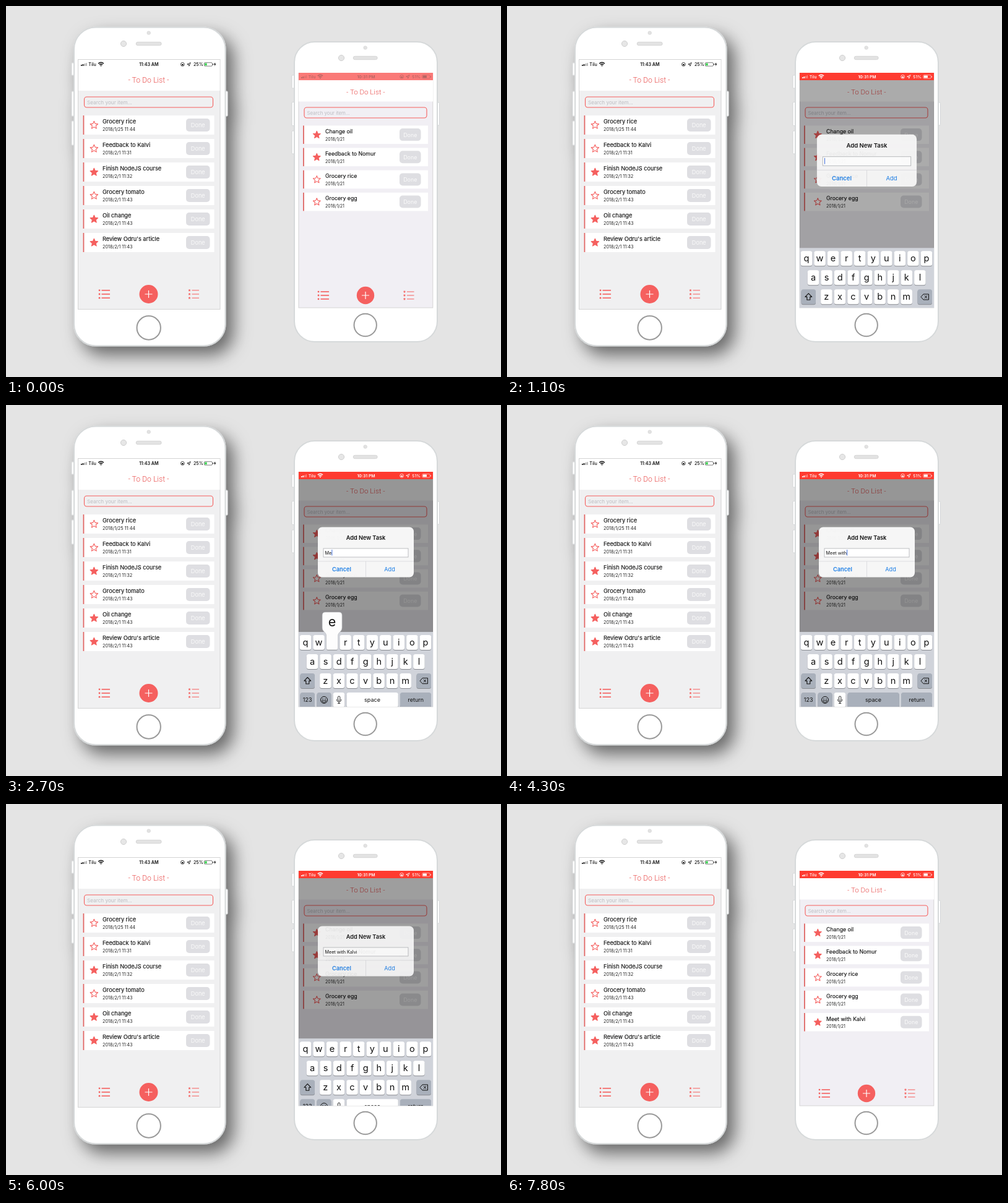
An HTML page that plays this animation: 800 px wide and 600 px high, repeating every 8 s.

```html
<!DOCTYPE html>
<html lang="en">
<head>
<meta charset="utf-8">
<title>To do list</title>
<style>
  html, body { margin: 0; width: 100%; height: 100%; overflow: hidden; background: #e4e4e4; }
  svg { display: block; width: 800px; height: 600px; font-family: Inter, sans-serif; }
  text { white-space: pre; }
  .mid { text-anchor: middle; }
  .title { font: 300 12px Roboto, sans-serif; text-anchor: middle; fill: #e9504f; }
</style>
</head>
<body>
<svg id="stage" viewBox="0 0 800 600"></svg>
<script>
const RED = '#f5605f';
const LOOP = 8000, STEP = 100;

const rect = (x, y, w, h, r, fill, more = '') =>
  `<rect x="${x}" y="${y}" width="${w}" height="${h}" rx="${r}" fill="${fill}" ${more}/>`;
const circle = (x, y, r, fill, more = '') =>
  `<circle cx="${x}" cy="${y}" r="${r}" fill="${fill}" ${more}/>`;
const path = (d, more = '') => `<path d="${d}" ${more}/>`;
const label = (x, y, size, str, more = '') =>
  `<text x="${x}" y="${y}" font-size="${size}" ${more}>${str}</text>`;
const stroke = (color, width = 1) => `fill="none" stroke="${color}" stroke-width="${width}"`;

function star(x, y, r, more) {
  let points = '';
  for (let i = 0; i < 10; i++) {
    const a = i * Math.PI / 5, d = i % 2 ? r * 0.46 : r;
    points += `${(x + d * Math.sin(a)).toFixed(2)},${(y - d * Math.cos(a)).toFixed(2)} `;
  }
  return `<polygon points="${points}" stroke="${RED}" stroke-linejoin="round" ${more}/>`;
}

// Phone shell: body box, side buttons, camera, speaker, home button.
function shell(p) {
  const { x, y, w, h, cx } = p;
  const edge = 'stroke="#d3d5d7" stroke-width="1"';
  const sides = p.leftKeys.map(([ky, kh]) => rect(x - 4, ky, 6, kh, 1.5, '#fff', edge)).join('') +
    rect(x + w - 2, p.rightKey[0], 5.5, p.rightKey[1], 1.5, '#fff', edge);
  const body = rect(x, y, w, h, p.radius, '#fff', 'stroke="#d6d9da" stroke-width="2"');
  return `<g ${p.shadow ? 'filter="url(#shadow)"' : ''}>${sides}${body}</g>` +
    circle(cx, p.dotY, 2.8, '#e2e2e2', 'stroke="#d2d2d2" stroke-width=".6"') +
    circle(p.camX, p.camY, 4.6, '#e6e6e6', 'stroke="#d0d0d0"') +
    rect(cx - p.speaker / 2, p.camY - 2.7, p.speaker, 5.4, 2.7, '#e3e3e3', 'stroke="#d0d0d0" stroke-width=".8"') +
    circle(cx, p.homeY, p.homeR, '#fff', 'stroke="#999" stroke-width="2"');
}

function status(s) {
  const { x, y, k, cx, right } = s;
  const ink = 'currentColor';
  let bars = '';
  for (let i = 0; i < 4; i++)
    bars += rect(x + i * 2.6 * k, y - 2 - i * 0.9, 1.7 * k, 2 + i * 0.9, 0.3, ink, i > 1 ? 'opacity=".4"' : '');
  const wx = x + 32.5 * k, wy = y;
  const wifi = path(`M${wx - 4.4 * k} ${wy - 3.9}q${4.4 * k} -3.8 ${8.8 * k} 0M${wx - 2.6 * k} ${wy - 2}q${2.6 * k} -2.2 ${5.2 * k} 0`, stroke(ink, 1.4)) +
    circle(wx, wy - 0.6, 1, ink);
  const lock = circle(right, y - 2.6, 2.9, 'none', `stroke="${ink}" stroke-width=".8"`) +
    rect(right - 1.3, y - 3, 2.6, 2, 0, ink);
  const ax = right + 10 * k;
  const arrow = path(`M${ax + 3} ${y - 5.4}l-5.5 2.6 2.6 .4 .4 2.6z`, stroke(ink, 0.8));
  const bx = right + 35 * k, bw = 13 * k;
  const battery = rect(bx, y - 5.4, bw, 5.6, 1.3, 'none', `stroke="${ink}" stroke-width=".7" opacity=".75"`) +
    rect(bx + 0.9, y - 4.5, bw * s.charge, 3.8, 0.5, s.battery) +
    rect(bx + bw + 0.7, y - 3.6, 1, 2, 0.4, ink);
  const bolt = s.bolt ? path(`M${bx + bw + 5} ${y - 6}l-2.6 3.8h1.8l-.6 2.8 2.6 -4h-1.8z`, `fill="${ink}"`) : '';
  return `<g fill="${ink}">${bars}${label(x + 12.3 * k, y, 7.1 * k, 'Tilu', 'font-weight="500"')}${wifi}` +
    label(cx, y, 7.2 * k, s.time, 'class="mid" font-weight="600"') + lock + arrow +
    label(right + 17.6 * k, y, 7.2 * k, s.percent, 'font-weight="500"') + battery + bolt + '</g>';
}

function row(l, i, [name, date, starred], id = '') {
  const y = l.y + i * l.pitch;
  const mark = star(l.starX, y + l.h / 2 + 0.3, l.starR, `fill="${starred ? RED : '#fff'}" stroke-width="1.1" ${id && `id="${id}Star"`}`);
  const [dx, dy, dw, dh] = l.done;
  return `<g ${id && `id="${id}"`}>` + rect(l.x, y, l.w, l.h, 0, '#fff') + rect(l.x, y, 1.8, l.h, 0, '#df6665') + mark +
    label(l.textX, y + l.nameY, l.nameSize, name, 'fill="#0a0a0a" stroke="#0a0a0a" stroke-width=".12"') +
    label(l.textX, y + l.dateY, l.dateSize, date, 'fill="#222"') +
    rect(dx, y + dy, dw, dh, 5, '#dedee2') +
    label(dx + dw / 2, y + dy + dh / 2 + 3.4, l.doneSize, 'Done', 'class="mid" fill="#fafafa"') + '</g>';
}

function tabs({ left, mid, right, y, r, gap }) {
  let out = '';
  for (let i = -1; i <= 1; i++) {
    const ly = y + i * gap;
    out += circle(left + 1.5, ly, 1.4, RED) + rect(left + 5, ly - 0.8, 13.5, 1.6, 0, RED) +
      star(right + 2, ly, 1.8, `fill="${RED}" stroke-width=".4"`) + rect(right + 6, ly - 0.5, 11.5, 1, 0, RED);
  }
  return out + circle(mid, y, r, RED) + path(`M${mid - 6} ${y}h12M${mid} ${y - 6}v12`, stroke('#fff', 1.2));
}

function search(x, y, w, size) {
  return rect(x, y, w, 17, 4, 'none', `stroke="${RED}" stroke-width="1.1"`) +
    label(x + 4.5, y + 11.5, size, 'Search your item...', 'fill="#bdbdc2"');
}

const heading = (x, y, size) => label(x, y, size, '- To Do List -', `class="title" style="font-size:${size}px"`);

const leftList = {
  x: 124.5, y: 177, w: 212, h: 31, pitch: 38, starX: 142.3, starR: 6.6, textX: 156,
  nameY: 13.4, nameSize: 9.2, dateY: 25.4, dateSize: 7.3, done: [291, 5, 38.5, 21], doneSize: 9.2
};
const rightList = {
  x: 480, y: 193.4, w: 202, h: 29.6, pitch: 36.15, starX: 502.3, starR: 6.2, textX: 516,
  nameY: 12.5, nameSize: 8.75, dateY: 24.3, dateSize: 7, done: [636, 4.7, 34.5, 20], doneSize: 8.9
};
const leftItems = [
  ['Grocery rice', '2018/1/25 11:44', 0], ['Feedback to Kalvi', '2018/2/1 11:31', 0],
  ['Finish NodeJS course', '2018/2/1 11:32', 1], ['Grocery tomato', '2018/2/1 11:43', 0],
  ['Oil change', '2018/2/1 11:43', 1], ["Review Odru's article", '2018/2/1 11:43', 1]
];
const rightItems = [
  ['Change oil', '2018/1/21', 1], ['Feedback to Nomur', '2018/1/21', 1],
  ['Grocery rice', '2018/1/21', 0], ['Grocery egg', '2018/1/21', 0]
];

// Keyboard layout in its resting position.
const KEY_W = 18.5, KEY_H = 24, PITCH = 21.55;
const keys = {};
[['qwertyuiop', 484], ['asdfghjkl', 495], ['zxcvbnm', 516.4]].forEach(([letters, x], r) =>
  [...letters].forEach((c, i) => keys[c] = { x: x + i * PITCH, y: 372 + r * 31 }));

const cap = (x, y, w, fill = '#fff', id = '') =>
  rect(x, y + 1, w, KEY_H, 3.5, '#8a8d92') + rect(x, y, w, KEY_H, 3.5, fill, id && `id="${id}"`);

function keyboard() {
  const grey = '#a9b0bb', word = 'class="mid" fill="#111"';
  let out = rect(473, 367, 217, 122, 0, '#d0d3da');
  for (const [c, k] of Object.entries(keys))
    out += cap(k.x - KEY_W / 2, k.y, KEY_W) + label(k.x, k.y + 16.6, 14.6, c, `${word} data-key="${c}"`);
  out += cap(475.5, 434, 23.5, grey, 'shiftCap') + cap(663.5, 434, 23.5, grey) +
    path('M487.3 440.5l5.4 5.6h-2.9v4.9h-5v-4.9h-2.9z', `id="shiftArrow" ${stroke('#111', 1.1)} stroke-linejoin="round"`) +
    path('M669 446.2l4 -4.5h8.5v9h-8.5zM675 444l4 4.4M679 444l-4 4.4', stroke('#111', 1));
  out += cap(475.5, 465, 23.5, grey) + cap(502.5, 465, 23, grey) + cap(528.7, 465, KEY_W) +
    cap(550.5, 465, 83.3, '#fff', 'spaceCap') + cap(637, 465, 50, grey) +
    label(487.2, 480, 9, '123', word) + label(592, 480, 9, 'space', word) + label(662.3, 480, 9, 'return', word) +
    circle(514, 477, 5.5, 'none', 'stroke="#111"') + circle(512, 475.5, 0.8, '#111') + circle(516, 475.5, 0.8, '#111') +
    path('M510.6 478h6.8q-.5 3.2 -3.4 3.2t-3.4 -3.2z', stroke('#111', 0.9)) +
    rect(536.4, 471, 3.4, 7, 1.7, '#fff', 'stroke="#111" stroke-width=".9"') +
    path('M534.4 476q0 4 3.7 4t3.7 -4M538.1 480v2.6M536 482.6h4.2', stroke('#111', 0.9));
  const bubble = 'M-16 -32q0 -5 5 -5h22q5 0 5 5v20c0 7 -6.5 7 -6.5 13v20q0 3 -3 3h-13q-3 0 -3 -3v-20c0 -6 -6.5 -6 -6.5 -13z';
  return `<g id="keyboard">${out}<g id="popup">` + path(bubble, 'fill="#fdfdfd" stroke="#b4b6bb" stroke-width=".6"') +
    label(0, -14, 21.5, '', `${word} id="popupText"`) + '</g></g>';
}

function alertBox() {
  const blue = 'class="mid" fill="#1a7de6"';
  return '<g id="alert">' + rect(-77.5, -40.5, 155, 81, 7, '#f8f8f8', 'fill-opacity=".98"') +
    label(0, -20, 9.2, 'Add New Task', 'class="mid" fill="#111" font-weight="600"') +
    rect(-68.5, -6, 137, 14, 0, '#fff', 'stroke="#aeb0b3" stroke-width=".8"') +
    label(-66, 3.7, 7.2, '', 'id="typed" fill="#111"') + rect(0, -4, 0.9, 9.5, 0, '#2f62d9', 'id="caret"') +
    path('M-77.5 14.8h155M0 14.8v25.7', stroke('#d5d5d8', 0.7)) +
    label(-39, 31, 9.2, 'Cancel', blue + ' font-weight="600"') + label(38.5, 31, 9.2, 'Add', blue) + '</g>';
}

const leftPhone = shell({
  x: 110, y: 34.5, w: 244.5, h: 515, radius: 35, cx: 230.7, shadow: true, leftKeys: [[92, 20], [138, 40], [186, 39]],
  rightKey: [138, 40], dotY: 43.5, camX: 190, camY: 61, speaker: 41, homeY: 520.5, homeR: 19.2
}) + rect(116.5, 86.5, 229.5, 404, 0, '#f0f0f1', 'stroke="#d4d4d4"') + rect(117, 87, 228.5, 50, 0, '#fff') +
  '<g color="#111">' + status({ x: 121, y: 97, k: 1, cx: 231, right: 285.3, time: '11:43 AM', percent: '25%', charge: 0.27, battery: '#3fd455', bolt: true }) + '</g>' +
  heading(230.5, 124, 12.2) + search(126.5, 147, 208, 8.2) + leftItems.map((it, i) => row(leftList, i, it)).join('') +
  tabs({ left: 149.5, mid: 230.5, right: 294.5, y: 466, r: 15, gap: 6.2 });

const rightPhone = shell({
  x: 466, y: 58, w: 231, h: 485, radius: 33, cx: 580.7, leftKeys: [[112, 21], [155.5, 38], [202, 37]],
  rightKey: [156, 37], dotY: 67.5, camX: 542, camY: 84, speaker: 39, homeY: 516, homeR: 18.2
}) + rect(473, 108.5, 216.8, 379.5, 0, '#f1eff4', 'stroke="#d4d4d4"') +
  '<g clip-path="url(#screen)">' + rect(473, 120, 217, 34.5, 0, '#fff') + heading(581.3, 143, 11.5) +
  search(482, 164, 198, 7.8) + rightItems.map((it, i) => row(rightList, i, it)).join('') +
  row(rightList, 4, ['Meet with Kalvi', '2018/1/21', 0], 'added') +
  tabs({ left: 503.5, mid: 581, right: 642, y: 468, r: 14.2, gap: 5.9 }) +
  rect(473, 120, 217, 369, 0, '#000', 'id="dim"') + alertBox() + keyboard() +
  '<g id="status">' + rect(473, 108, 217, 12, 0, '#fe3b30', 'id="statusBar"') +
  status({ x: 477, y: 117, k: 0.95, cx: 582, right: 639.6, time: '10:31 PM', percent: '51%', charge: 0.5, battery: 'currentColor' }) + '</g></g>';

const stage = document.getElementById('stage');
stage.innerHTML = `<defs>
  <filter id="shadow" x="-30%" y="-20%" width="170%" height="150%">
    <feDropShadow dx="12" dy="14" stdDeviation="14" flood-color="#000" flood-opacity=".55"/></filter>
  <clipPath id="screen"><rect x="473" y="108" width="217" height="380"/></clipPath></defs>` + leftPhone + rightPhone;

const $ = id => document.getElementById(id);
const clamp = v => Math.max(0, Math.min(1, v));
const mix = (a, b, p) => `rgb(${a.map((v, i) => Math.round(v + (b[i] - v) * p))})`;
const show = (id, on) => $(id).style.visibility = on ? 'visible' : 'hidden';

// [press, release, key]
const presses = [
  [2400, 2500, 'M'], [2600, 2800, 'e'], [2900, 3000, 'e'], [3200, 3300, 't'], [3500, 3700, ' '],
  [3700, 3800, 'w'], [3900, 4000, 'i'], [4000, 4100, 't'], [4100, 4200, 'h'], [4300, 4400, ' '],
  [4600, 4800, 'K'], [4900, 5000, 'a'], [5000, 5200, 'l'], [5400, 5500, 'v'], [5600, 5700, 'i']
];
const shifts = [[2100, 2500], [4500, 4800]];
const OPEN = 850, CLOSE = 5960, ADDED = 6300, STARRED = 6900;

function render(t) {
  const opening = t < OPEN ? 0 : 1 - Math.exp((OPEN - t) / 155);
  const c = Math.max(0, t - CLOSE) * 0.0133;
  const closing = 1 - (1 + c) * Math.exp(-c);
  const fade = 1 - clamp((t - 5980) / 270);

  const boardY = 122 * (t < CLOSE ? 1 - opening : closing);
  $('keyboard').setAttribute('transform', `translate(0 ${boardY})`);
  $('alert').setAttribute('transform', `translate(581.5 ${298 - 60 * opening}) scale(${1.2 - 0.2 * opening})`);
  $('alert').setAttribute('opacity', clamp(opening * 1.2) * fade);
  $('dim').setAttribute('opacity', 0.41 * opening * fade);

  const typed = presses.filter(([down, up, key]) => t >= (key === ' ' ? up : down)).map(p => p[2]).join('');
  $('typed').textContent = typed;
  $('caret').setAttribute('x', -65.8 + (typed ? $('typed').getComputedTextLength() : 0));
  show('caret', t < 5900);

  const upper = shifts.some(([on, off]) => t >= on && t < off);
  stage.querySelectorAll('[data-key]').forEach(el =>
    el.textContent = upper ? el.dataset.key.toUpperCase() : el.dataset.key);
  $('shiftCap').setAttribute('fill', upper ? '#fff' : '#a9b0bb');
  $('shiftArrow').setAttribute('fill', upper ? '#111' : 'none');

  const active = presses.find(([down, up]) => t >= down && t < up);
  const key = active && active[2];
  $('spaceCap').setAttribute('fill', key === ' ' ? '#a9b0bb' : '#fff');
  const lettered = key && key !== ' ';
  show('popup', lettered);
  if (lettered) {
    const k = keys[key.toLowerCase()];
    $('popup').setAttribute('transform', `translate(${k.x} ${k.y})`);
    $('popupText').textContent = key;
  }

  show('added', t >= ADDED);
  $('addedStar').setAttribute('fill', t >= STARRED ? RED : '#fff');

  const settle = clamp(t / 400);
  $('statusBar').setAttribute('fill', mix([250, 121, 119], [254, 59, 48], settle));
  $('status').style.color = mix([180, 100, 98], [255, 255, 255], settle);
}

function tick() {
  const t = performance.now() % LOOP;
  render(Math.floor(t / STEP) * STEP);
  requestAnimationFrame(tick);
}
tick();
</script>
</body>
</html>
```
